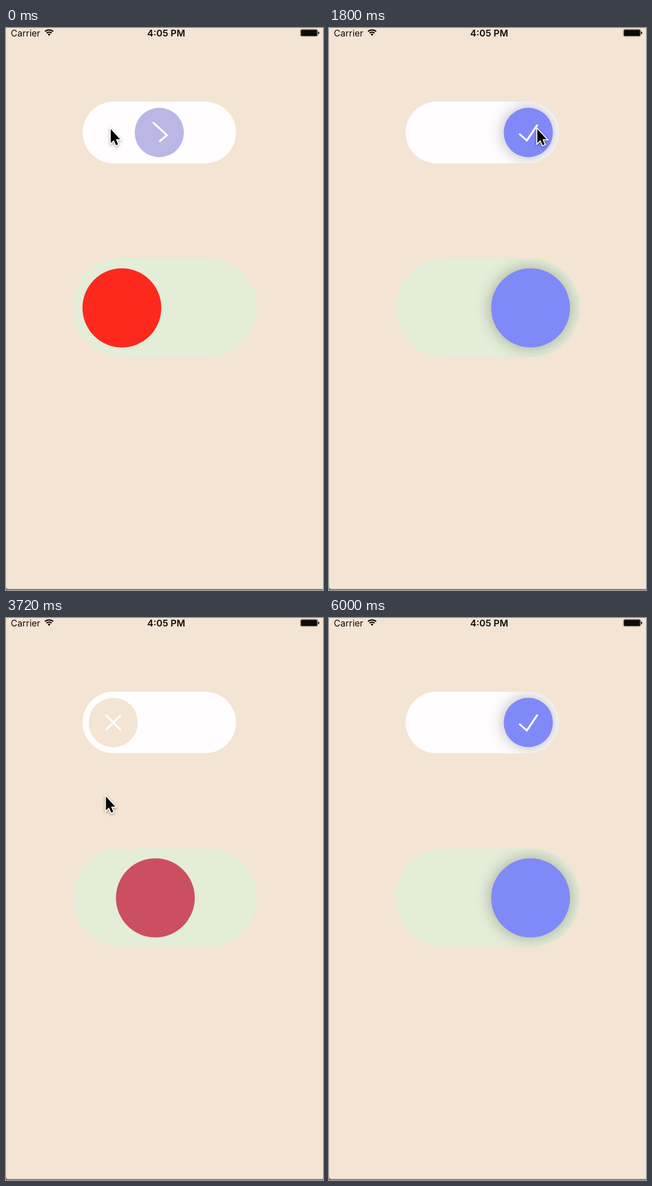
Animation of 563x995 px, one loop 6.04 s. Source, as an HTML page with a canvas:

```html
<!DOCTYPE html>
<html lang="en">
<head>
<meta charset="utf-8">
<title>Switches</title>
<style>
html, body { margin: 0; width: 100%; height: 100%; overflow: hidden; background: #f3e4d4; }
canvas { display: block; }
</style>
</head>
<body>
<canvas id="stage" width="563" height="995"></canvas>
<script>
const ctx = document.getElementById('stage').getContext('2d');
const LOOP = 6040, STEP = 40, MOVE = 500, FADE = 300;
const SHADE = 0.3, BLUR = 28, DARKEST = 28;
const BG = [243, 228, 212], BLUE = [128, 137, 248], RED = [252, 41, 0];

// flips: times at which the switch toggles, the first one turning it on
const small = {
  x: 136, y: 130.5, w: 272.5, h: 109, pad: 10.8,
  fill: '#fffdfe', off: BG, icon: true, flips: [-250, 1920, 4340]
};
const large = {
  x: 118.3, y: 408, w: 327.2, h: 175, pad: 17.5,
  fill: '#e3edd8', off: RED, icon: false, flips: [630, 2720, 3502]
};

// Places where the pointer rests; bow bends the way there sideways
const stops = [
  { at: 0, until: 90, x: 186, y: 179 },
  { at: 520, until: 840, x: 186, y: 501 },
  { at: 1740, until: 2060, x: 370, y: 179, bow: 172 },
  { at: 2560, until: 2800, x: 364, y: 519 },
  { at: 3140, until: 3500, x: 161, y: 510 },
  { at: 3940, until: 4040, x: 194, y: 122 },
  { at: 4240, until: 4420, x: 186, y: 179 },
  { at: 4900, until: LOOP, x: -40, y: 215 }
];

const arrow = new Path2D('M0 0V24.5L5.4 19.4 9.4 28.5 13 27 9.2 18H16.6Z');

const clamp = v => Math.max(0, Math.min(1, v));
const mix = (a, b, f) => a + (b - a) * f;
const smooth = u => u * u * (3 - 2 * u);
const rgb = (a, b, f) =>
  `rgb(${a.map((v, i) => Math.round(Math.max(DARKEST, mix(v, b[i], f))))})`;

// Cubic ease-in-out with control points (.42, 0) and (.58, 1)
function ease(u) {
  if (u <= 0 || u >= 1) return clamp(u);
  let lo = 0, hi = 1;
  for (let i = 0; i < 24; i++) {
    const s = (lo + hi) / 2;
    const x = 1.26 * s * (1 - s) ** 2 + 1.74 * s * s * (1 - s) + s ** 3;
    if (x < u) lo = s; else hi = s;
  }
  return smooth(lo);
}

function switchState(flips, t) {
  const count = flips.filter(time => time <= t).length;
  if (!count) return { f: 0, glow: 0 };
  const age = t - flips[count - 1];
  const f = ease(clamp(age / MOVE));
  return count % 2
    ? { f, glow: clamp((age - MOVE) / FADE) }
    : { f: 1 - f, glow: 0 };
}

function pointerAt(t) {
  const i = stops.findIndex(s => t <= s.until);
  const b = stops[i], a = stops[i - 1] || b;
  const u = t >= b.at ? 1 : (t - a.until) / (b.at - a.until);
  const side = (b.bow || 0) * Math.sin(Math.PI * u);
  return [mix(a.x, b.x, smooth(u)) + side, mix(a.y, b.y, smooth(u))];
}

function roundRect(x, y, w, h, r) {
  ctx.beginPath();
  ctx.roundRect(x, y, w, h, r);
}

// Cross that turns half a circle while becoming a tick
function drawIcon(x, y, f) {
  const g = clamp(f * 2), c = 12.7;
  const line = (cross, tick) => {
    const p = cross.map((v, i) => mix(v, tick[i], g));
    ctx.moveTo(p[0], p[1]);
    ctx.lineTo(p[2], p[3]);
  };
  ctx.save();
  ctx.translate(x, y);
  ctx.rotate(-Math.PI * (1 - f) + 0.14 * Math.sin(Math.PI * f));
  ctx.strokeStyle = '#fff';
  ctx.lineWidth = 3.4;
  ctx.lineCap = 'round';
  ctx.beginPath();
  line([c, -c, -c, c], [15.6, -12.8, -2.7, 14.2]);
  line([-c, -c, c, c], [-15, 3.2, -2.7, 14.2]);
  ctx.stroke();
  ctx.restore();
}

function drawSwitch(s, t) {
  const { f, glow } = switchState(s.flips, t);
  const half = s.h / 2, y = s.y + half;
  const x = mix(s.x + half, s.x + s.w - half, f);
  ctx.save();
  roundRect(s.x, s.y, s.w, s.h, half);
  ctx.fillStyle = s.fill;
  ctx.fill();
  ctx.clip();
  ctx.shadowColor = `rgba(0,0,0,${SHADE * glow})`;
  ctx.shadowBlur = BLUR;
  ctx.fillStyle = rgb(s.off, BLUE, f);
  ctx.beginPath();
  ctx.arc(x, y, half - s.pad, 0, Math.PI * 2);
  ctx.fill();
  ctx.restore();
  if (s.icon) drawIcon(x, y, f);
}

function drawStatus() {
  ctx.fillStyle = ctx.strokeStyle = '#0c0b0a';
  ctx.textAlign = 'left';
  ctx.font = '400 16px Inter, Roboto, sans-serif';
  ctx.fillText('Carrier', 8.5, 14.6);
  ctx.textAlign = 'center';
  ctx.font = '600 16.5px Inter, Roboto, sans-serif';
  ctx.fillText('4:05 PM', 284.5, 14.6);

  // Wireless fan
  const a = -Math.PI * 0.75, b = -Math.PI * 0.25;
  ctx.lineWidth = 2.3;
  for (const r of [6.2, 10.2]) {
    ctx.beginPath();
    ctx.arc(76.5, 13.5, r, a, b);
    ctx.stroke();
  }
  ctx.beginPath();
  ctx.moveTo(76.5, 14);
  ctx.arc(76.5, 13.5, 3.4, a, b);
  ctx.fill();

  // Battery
  ctx.strokeStyle = '#5c5750';
  ctx.lineWidth = 0.8;
  roundRect(522.9, 2.4, 30.6, 12.4, 2.6);
  ctx.stroke();
  roundRect(523.8, 3.2, 28.8, 10.8, 1.6);
  ctx.fill();
  roundRect(554.3, 6.6, 1.9, 4.4, 1);
  ctx.fill();
}

function drawPointer(t) {
  ctx.save();
  ctx.translate(...pointerAt(t));
  ctx.shadowColor = 'rgba(0,0,0,.35)';
  ctx.shadowBlur = 5;
  ctx.shadowOffsetY = 2;
  ctx.strokeStyle = '#fff';
  ctx.lineWidth = 3.4;
  ctx.stroke(arrow);
  ctx.shadowColor = 'transparent';
  ctx.fillStyle = '#000';
  ctx.fill(arrow);
  ctx.restore();
}

function drawEdge() {
  ctx.fillStyle = '#77716b';
  ctx.fillRect(0, 993.3, 563, 1.7);
  ctx.beginPath();
  ctx.moveTo(0, 989);
  ctx.quadraticCurveTo(0.5, 993.3, 5, 993.5);
  ctx.lineTo(0, 995);
  ctx.fill();
}

function draw(t) {
  ctx.fillStyle = rgb(BG, BG, 0);
  ctx.fillRect(0, 0, 563, 995);
  drawStatus();
  drawSwitch(small, t);
  drawSwitch(large, t);
  drawEdge();
  drawPointer(t);
}

const start = performance.now();
function tick() {
  const t = (performance.now() - start) % LOOP;
  draw(Math.floor(t / STEP) * STEP);
  requestAnimationFrame(tick);
}
tick();
</script>
</body>
</html>
```
